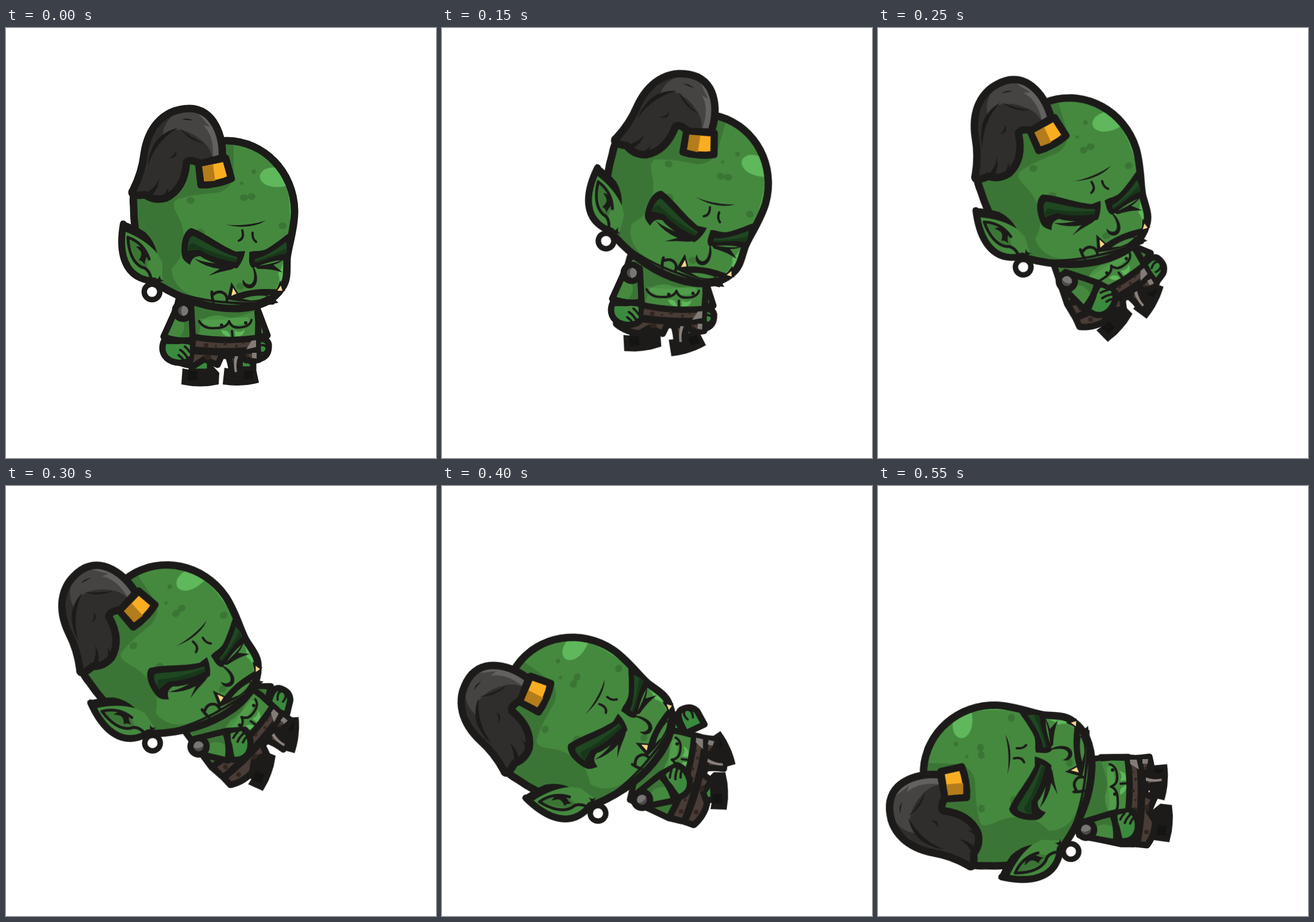
Animation, 748 px wide and 748 px high, one loop 750 ms. Source, as an HTML page:

```html
<!DOCTYPE html>
<html lang="en">
<head>
<meta charset="utf-8">
<title>Orc falling</title>
<style>
html, body { margin: 0; width: 100%; height: 100%; overflow: hidden; background: #fff; }
svg { display: block; width: 100vw; height: 100vh; }

.part { animation: .75s infinite step-end; }
#head { animation-name: head; }
#torso { animation-name: torso; }
#armL { animation-name: arm-l; }
#armR { animation-name: arm-r; }
#legL { animation-name: leg-l; }
#legR { animation-name: leg-r; }

/* Poses are blended linearly in 50 ms steps, then held. */
@keyframes head {
  0% { transform: translate(385px, 485px) rotate(0deg); animation-timing-function: steps(3); }
  20% { transform: translate(403.8px, 432.2px) rotate(16.3deg); }
  26.666% { transform: translate(393px, 409.5px) rotate(0deg); animation-timing-function: steps(2); }
  40% { transform: translate(378px, 395.5px) rotate(-34deg); animation-timing-function: steps(2); }
  53.333% { transform: translate(367.8px, 477px) rotate(-55deg); }
  60% { transform: translate(368.7px, 520px) rotate(-65.4deg); animation-timing-function: steps(2); }
  73.333%, 100% { transform: translate(368px, 506.3px) rotate(-87.2deg); }
}
@keyframes torso {
  0% { transform: translate(385px, 545px) rotate(0deg); animation-timing-function: steps(3); }
  20% { transform: translate(403px, 492px) rotate(3deg); }
  26.666% { transform: translate(408px, 463px) rotate(-13deg); animation-timing-function: steps(2); }
  40% { transform: translate(434px, 427px) rotate(-49deg); animation-timing-function: steps(2); }
  53.333% { transform: translate(433px, 487px) rotate(-77deg); }
  60% { transform: translate(437px, 520px) rotate(-87deg); animation-timing-function: steps(2); }
  73.333%, 100% { transform: translate(440px, 526px) rotate(-90deg); }
}
@keyframes arm-l {
  0% { transform: translate(308px, 492px) rotate(0deg); animation-timing-function: steps(3); }
  20% { transform: translate(330px, 426px) rotate(0deg); }
  26.666% { transform: translate(322px, 428px) rotate(-36deg); animation-timing-function: steps(2); }
  40% { transform: translate(335px, 453px) rotate(-101deg); animation-timing-function: steps(2); }
  53.333% { transform: translate(348px, 546px) rotate(-126deg); }
  60% { transform: translate(360px, 595px) rotate(-145deg); animation-timing-function: steps(2); }
  73.333%, 100% { transform: translate(362px, 598px) rotate(-104deg); }
}
@keyframes arm-r {
  0% { transform: translate(432px, 500px) rotate(0deg); animation-timing-function: steps(3); }
  20% { transform: translate(451px, 447px) rotate(3deg); }
  26.666% { transform: translate(446px, 411px) rotate(-24deg); animation-timing-function: steps(2); }
  40% { transform: translate(420px, 358px) rotate(-70deg); animation-timing-function: steps(2); }
  53.333% { transform: translate(379px, 431px) rotate(-112deg); }
  60% { transform: translate(370px, 475px) rotate(-125deg); animation-timing-function: steps(2); }
  73.333%, 100% { transform: translate(395px, 481px) rotate(-70deg); }
}
@keyframes leg-l {
  0% { transform: translate(338px, 622px) rotate(0deg); animation-timing-function: steps(3); }
  20% { transform: translate(350px, 560px) rotate(-7deg); }
  26.666% { transform: translate(386px, 545px) rotate(-27deg); animation-timing-function: steps(2); }
  40% { transform: translate(460px, 500px) rotate(-70deg); animation-timing-function: steps(2); }
  53.333% { transform: translate(496px, 530px) rotate(-92deg); }
  60% { transform: translate(503px, 549px) rotate(-112deg); animation-timing-function: steps(2); }
  73.333%, 100% { transform: translate(511px, 587px) rotate(-86deg); }
}
@keyframes leg-r {
  0% { transform: translate(408px, 620px) rotate(0deg); animation-timing-function: steps(3); }
  20% { transform: translate(429px, 563px) rotate(-15deg); }
  26.666% { transform: translate(459px, 524px) rotate(-38deg); animation-timing-function: steps(2); }
  40% { transform: translate(507px, 434px) rotate(-81deg); animation-timing-function: steps(2); }
  53.333% { transform: translate(499px, 455px) rotate(-112deg); }
  60% { transform: translate(488px, 468px) rotate(-127deg); animation-timing-function: steps(2); }
  73.333%, 100% { transform: translate(502px, 516px) rotate(-83deg); }
}

.ink { fill: #1c1b19; }
.line { fill: none; stroke: #1c1b19; stroke-linecap: round; stroke-linejoin: round; stroke-width: 4; }
.edge { stroke: #1c1b19; stroke-width: 11; stroke-linejoin: round; }
.rim { fill: none; stroke: #1c1b19; stroke-width: 13; stroke-linejoin: round; }
.green { fill: #45893f; }
.dark { fill: #3b7535; }
.lite { fill: #5fb85b; }
.skin { fill: #3a8b3e; }
.brow { fill: #1f4722; }
.hide { fill: #4a3c36; }
.pit { fill: #30261f; }
.gold { fill: #f9ae22; }
.tusk { fill: #fbd98a; }
</style>
</head>
<body>
<svg viewBox="0 0 748 748">
  <defs>
    <path id="skull" d="M222 310C214 240 296 196 385 196C448 197 501 250 502 318C502 350 491 380 489 400C488 420 491 438 480 452C466 474 440 486 405 488C345 490 296 466 264 446C236 420 222 360 222 310Z"/>
    <clipPath id="inHead"><use href="#skull"/></clipPath>
    <path id="mane" d="M376 226C379 190 362 140 319 140C270 141 246 178 240 220C237 246 230 264 221 282C215 289 224 293 242 290C254 299 266 299 278 296C302 284 312 262 314 234C319 228 328 231 338 236Z"/>
    <clipPath id="inMane"><use href="#mane"/></clipPath>
  </defs>

  <g id="legL" class="part"><g transform="translate(-338 -622)">
    <path class="skin edge" d="M323 562H355V598H323Z" stroke-width="9"/>
    <path class="ink" d="M307 592Q332 599 361 589L371 600L370 620Q338 627 305 620Z"/>
    <path d="M316 596H333V613H316Z" fill="#141412"/>
  </g></g>

  <g id="legR" class="part"><g transform="translate(-408 -620)">
    <path class="skin edge" d="M396 562H430V594H396Z" stroke-width="9"/>
    <path class="ink" d="M380 591Q406 597 434 589L440 617Q410 625 377 620Z"/>
    <path d="M414 596H430V611H414Z" fill="#141412"/>
  </g></g>

  <g id="armR" class="part"><g transform="translate(-432 -500)">
    <path class="skin edge" d="M408 486L438 490L455 535L412 540Z"/>
    <path class="skin edge" d="M416 542C446 538 455 541 457 550C458 562 454 571 444 575L418 578Z"/>
    <path class="dark" d="M430 497L437 498L447 528L437 532Z"/>
    <path class="line" d="M437 554Q448 549 452 554M437 564Q447 568 452 562"/>
  </g></g>

  <g id="torso" class="part"><g transform="translate(-385 -545)">
    <path class="green edge" d="M304 455L288 528V550H438L439 512L434 455Z"/>
    <path class="dark" d="M310 460L294 528L330 540Q343 522 336 505Q380 514 433 492L429 460Z"/>
    <path class="lite" d="M340 512Q358 524 384 517L386 510Q390 520 396 517L424 514Q424 502 418 503Q390 506 372 500Q346 500 340 512Z" opacity=".4"/>
    <path class="lite" d="M374 526Q388 524 390 537Q378 537 374 526ZM398 526Q408 532 415 524Q414 538 399 536Z"/>
    <path class="line" d="M336 510Q344 524 364 522Q384 522 388 510Q392 522 406 521Q424 520 427 508M393 527L394 537"/>
    <circle class="ink" cx="375" cy="517" r="3"/><circle class="ink" cx="417" cy="513" r="3"/>
    <path class="hide edge" d="M288 556Q360 570 438 560L440 577L426 580L412 572L375 570L368 586L345 576L328 587Q305 587 286 573Z"/>
    <path class="hide edge" d="M289 528Q360 550 437 539L438 559Q370 567 288 555Z" stroke-width="9"/>
    <path d="M427 544L435 543L435 555L418 559ZM428 565H436V575L428 574Z" fill="#827b78"/>
    <g class="pit">
      <circle cx="348" cy="552" r="4"/><circle cx="365" cy="553" r="2"/><circle cx="381" cy="549" r="3"/>
      <circle cx="401" cy="553" r="2.5"/><circle cx="413" cy="548" r="2"/><circle cx="304" cy="546" r="4"/>
      <circle cx="325" cy="549" r="2.5"/><ellipse cx="351" cy="573" rx="6" ry="4"/>
      <circle cx="420" cy="571" r="2.5"/><circle cx="309" cy="572" r="4"/>
    </g>
    <path class="hide edge" d="M386 570L411 568Q404 584 407 600L393 602Q392 584 386 570Z" stroke-width="8"/>
    <path d="M398 571H404Q399 585 402 598L398 599Q395 585 398 571Z" fill="#8a817c"/>
  </g></g>

  <g id="armL" class="part"><g transform="translate(-308 -492)">
    <path class="skin edge" d="M275 544C268 560 274 574 289 580C300 584 312 583 321 577L325 545Z"/>
    <path class="green edge" d="M298 484L274 537Q300 547 325 542L322 484Z"/>
    <path class="dark" d="M308 508L318 507L319 537L302 538Q314 524 308 508Z"/>
    <path class="green" d="M291 553Q306 546 320 552V571L306 572Q302 562 291 553Z"/>
    <path class="line" d="M303 560Q312 566 316 575M300 569Q306 573 309 578M311 554Q316 558 320 564" stroke-width="3.5"/>
    <circle class="edge" cx="308" cy="492" r="14" fill="#4c4b4a" stroke-width="8"/>
    <path d="M308 483A9 9 0 0 1 308 501Q302 492 308 483Z" fill="#787776"/>
  </g></g>

  <g id="head" class="part"><g transform="translate(-385 -485)">
    <circle class="line" cx="254" cy="459" r="13.5" style="stroke-width:9.5"/>
    <use href="#skull" class="dark"/>
    <g clip-path="url(#inHead)">
      <path class="green" d="M396 190V262Q386 284 365 287Q320 290 296 299Q288 305 297 323Q313 350 309 382Q305 402 288 419Q290 448 318 463Q370 485 440 483L520 440V190Z"/>
      <path class="lite" d="M415 200Q452 212 474 244Q462 240 450 246Q437 255 444 266Q456 281 487 275Q495 296 494 335L510 330V230L450 190Z"/>
      <path class="lite" d="M484 399Q480 420 473 427Q480 438 468 456L480 463L496 436V398ZM430 478Q460 478 477 463L468 462Q450 472 430 472Z"/>
      <g class="dark">
        <ellipse cx="414" cy="295" rx="7" ry="6"/><ellipse cx="427" cy="293" rx="7" ry="6"/>
        <circle cx="410" cy="270" r="3"/><circle cx="431" cy="250" r="4"/>
        <ellipse cx="365" cy="280" rx="8" ry="6"/><ellipse cx="321" cy="300" rx="7" ry="6"/>
        <ellipse cx="481" cy="344" rx="7" ry="6"/><circle cx="338" cy="357" r="8"/>
        <ellipse cx="408" cy="449" rx="7" ry="6"/>
      </g>
    </g>
    <use href="#skull" class="rim"/>

    <!-- ear -->
    <path class="green" d="M204 341L246 362L272 408L272 442L240 438L208 412Z"/>
    <path class="line" d="M258 440C240 440 222 432 212 416C200 397 199 370 204 341" style="stroke-width:12"/>
    <path class="ink" d="M200 335Q220 341 242 355Q258 370 263 392Q242 367 204 353Z"/>
    <path class="dark" d="M214 367Q240 376 248 402Q245 410 246 424Q222 408 214 367Z"/>
    <path class="line" d="M212 364Q240 374 249 402M212 364C213 390 222 409 236 416Q248 418 252 434" style="stroke-width:5"/>
    <path class="ink" d="M226 380Q243 379 246 396Q242 402 241 412Q237 404 231 404Q238 394 234 388ZM244 444Q262 444 268 430Q267 438 275 440Q265 440 262 450Z"/>

    <!-- brows and eyes -->
    <path class="ink" d="M306 396C303 370 311 350 323 348C346 356 371 377 400 389L416 388C414 400 408 412 402 418C380 415 352 407 338 397C327 397 323 402 320 412C311 406 307 402 306 396Z"/>
    <path class="brow" d="M316 388C316 371 320 361 326 362C346 371 374 391 403 399L400 407C378 404 353 396 338 386Q324 385 316 388Z"/>
    <path d="M317 383Q320 373 326 374Q352 390 402 402L400 407C378 404 353 396 338 386Q326 383 317 387Z" fill="#183619"/>
    <path class="ink" d="M327 401C346 408 368 412 393 408L405 414L392 420Q372 424 352 431L372 419Q346 416 327 401Z"/>
    <path class="ink" d="M423 390C433 386 440 390 452 385C470 375 484 362 492 357C493 372 498 385 491 402L483 404C462 403 442 414 428 417C420 409 424 399 423 390Z"/>
    <path class="brow" d="M433 402C451 398 474 383 487 372Q490 382 487 393C468 393 450 405 433 408Z"/>
    <path d="M433 405Q460 398 487 383V393C468 393 450 405 433 408Z" fill="#183619"/>
    <path class="ink" d="M432 414Q462 412 484 402Q476 409 465 412L481 425Q460 418 438 419Z"/>
    <path class="line" d="M411 352Q415 366 405 370M429 356Q428 367 435 372"/>
    <path class="ink" d="M382 342Q416 346 452 335Q424 352 382 342Z"/>
    <path class="ink" d="M427 411C440 424 441 452 424 453C415 453 410 445 412 437Q417 447 425 446C434 442 433 426 427 411Z"/>

    <!-- jaw and mouth -->
    <path class="ink" d="M297 458Q342 474 400 476Q440 478 470 473L466 481Q430 484 390 480Q330 476 297 458Z"/>
    <path class="line" d="M358 459Q358 470 361 476M361 463Q372 455 381 463Q386 468 384 476" style="stroke-width:5"/>
    <path class="ink" d="M384 472C406 455 446 451 484 456Q470 464 455 465L466 473Q420 480 384 472Z"/>
    <path class="green" d="M411 471Q432 464 454 466Q446 473 426 474Z"/>
    <path class="ink" d="M392 442L385 471L404 462ZM477 439L469 460L486 457ZM464 469L474 478L462 480Z"/>
    <path class="tusk" d="M395 452L392 466L401 462ZM478 448L472 457L481 457Z"/>

    <!-- ponytail -->
    <use href="#mane" fill="#2f2e2d"/>
    <g clip-path="url(#inMane)">
      <path d="M272 190Q274 160 300 145L350 138L380 180V228L360 232Q358 208 338 194Q312 173 286 178Q262 190 249 222Q253 200 272 190Z" fill="#454443"/>
      <path d="M330 143Q343 159 355 172Q350 171 343 169Q362 187 360 224L376 227L382 180L355 140ZM262 178Q273 158 294 147L275 145L251 181Z" fill="#626160"/>
      <path d="M345 153Q358 167 366 182Q369 194 369 206Q372 190 372 181Q366 164 345 153Z" fill="#454443"/>
    </g>
    <use href="#mane" class="rim"/>
    <path class="ink" d="M247 238C249 202 270 180 299 174Q262 195 247 238ZM302 174Q322 191 345 201Q319 197 302 174ZM306 159Q315 155 326 161Q315 160 306 159ZM296 213Q299 227 283 226Q293 223 296 213ZM243 288Q262 276 266 262Q265 282 250 294ZM267 296Q279 288 282 277Q283 291 276 298Z"/>
    <path class="gold edge" d="M335 236L382 226L392 262Q368 273 339 273Z" style="stroke-width:12.5"/>
    <path d="M341 241L360 237L364 266L345 267Z" fill="#b47c1a"/>
  </g></g>
</svg>
</body>
</html>
```
